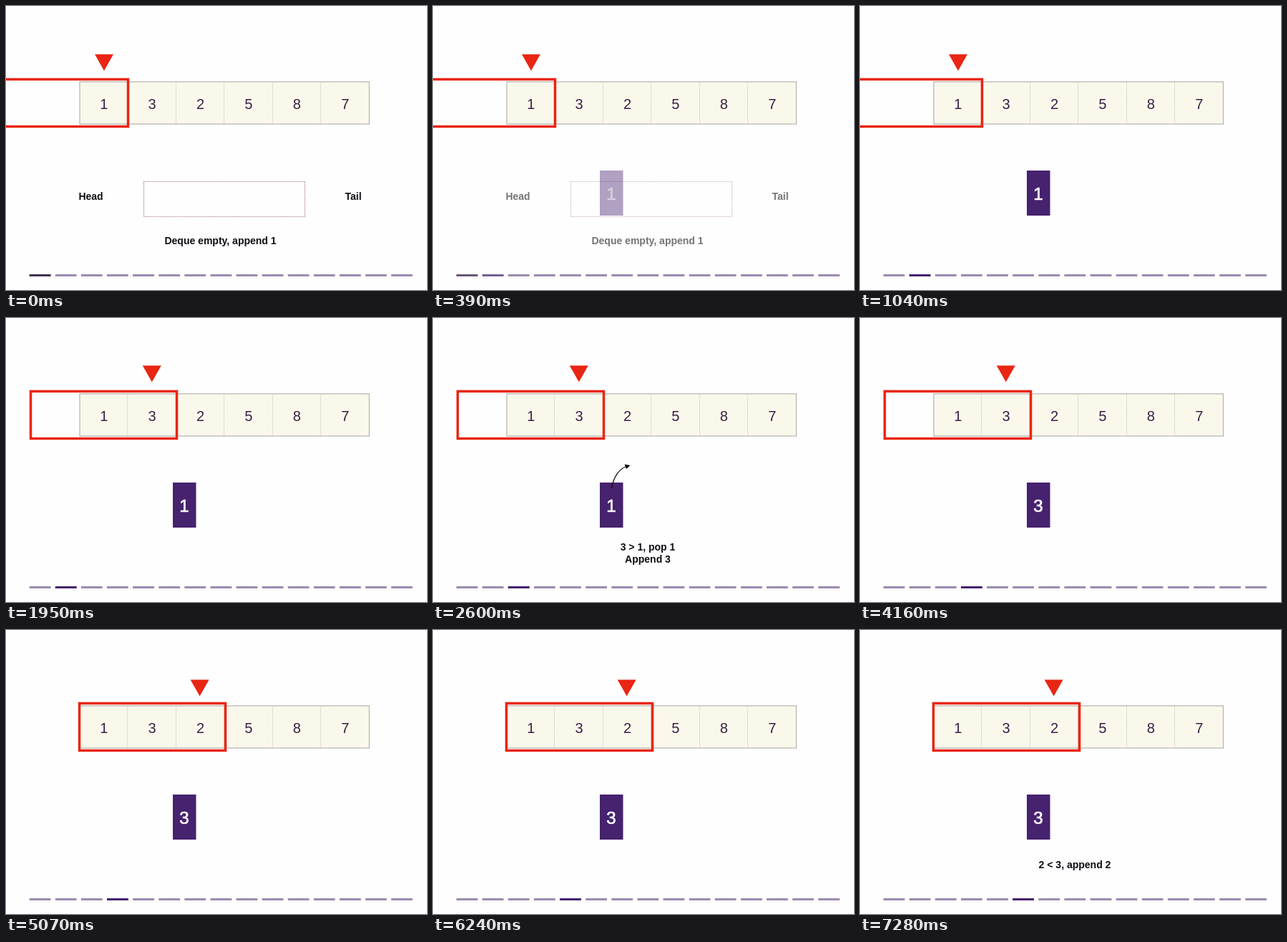
These frames come from a looping animation (588 px wide and 397 px high, 8 s). An HTML page with a canvas:

```html
<!DOCTYPE html>
<html lang="en">
<head>
<meta charset="utf-8">
<title>Sliding window deque</title>
<style>
html, body { margin: 0; width: 100%; height: 100%; overflow: hidden; background: #fefefe; }
canvas { display: block; }
</style>
</head>
<body>
<canvas id="stage" width="588" height="397"></canvas>
<script>
const ctx = document.getElementById('stage').getContext('2d');
const LOOP = 8000, STEP = 130;
const RED = '#e92513', PURPLE = '#46226f', INK = '#100c14';
const SANS = '"Liberation Sans", Arial, sans-serif';
const VALUES = [1, 3, 2, 5, 8, 7];
const CELL = { x: 103, y: 106, w: 67.4, h: 59 };
const MARKER_TOPS = [67.5, 66.5, 69.5];

const progress = (t, from, to) => Math.min(1, Math.max(0, (t - from) / (to - from)));

function withAlpha(alpha, draw) {
  if (alpha <= 0) return;
  ctx.save();
  ctx.globalAlpha = alpha;
  draw();
  ctx.restore();
}

function label(text, x, y, font, color) {
  ctx.font = `${font} ${SANS}`;
  ctx.fillStyle = color;
  ctx.fillText(text, x, y);
}

const caption = (text, x, y) => label(text, x, y, 'bold 14px', INK);

function line(color, width, dash = []) {
  ctx.strokeStyle = color;
  ctx.lineWidth = width;
  ctx.setLineDash(dash);
}

function polygon(color, ...points) {
  ctx.fillStyle = color;
  ctx.beginPath();
  points.forEach(([x, y]) => ctx.lineTo(x, y));
  ctx.fill();
}

function drawArray() {
  const { x, y, w, h } = CELL;
  ctx.fillStyle = '#faf8eb';
  ctx.fillRect(x, y, w * 6, h);
  VALUES.forEach((value, i) => {
    const left = x + i * w;
    if (i) {
      line('#c5c1ba', 1, [1, 1]);
      ctx.beginPath();
      ctx.moveTo(Math.round(left) - 0.5, y);
      ctx.lineTo(Math.round(left) - 0.5, y + h);
      ctx.stroke();
    }
    label(value, left + w / 2, 143.5, '20px', '#3b2046');
  });
  line('#bbb9b6', 1.3);
  ctx.strokeRect(x, y, w * 6, h);
}

function drawWindow(index) {
  const middle = 137 + index * 66.8, top = MARKER_TOPS[index];
  line(RED, 3.5);
  ctx.strokeRect(-33.5 + index * 68, 102.5, 204, 66);
  polygon(RED, [middle - 13, top], [middle + 13, top], [middle, top + 23]);
}

function drawEmptyDeque() {
  line('#a3708c', 1.2, [1.2, 1.2]);
  ctx.strokeRect(192.5, 245.5, 225, 49);
  caption('Head', 118.5, 271);
  caption('Tail', 485, 271);
  caption('Deque empty, append 1', 299.5, 333);
}

function drawBlock() {
  ctx.fillStyle = PURPLE;
  ctx.fillRect(233, 230, 32.5, 63);
}

function blockDigit(value) {
  label(value, 249, 270.5, '24px', '#fff');
  line('#fff', 0.7);
  ctx.strokeText(value, 249, 270.5);
}

function drawPop() {
  line(INK, 1.3);
  ctx.beginPath();
  ctx.moveTo(249.5, 238);
  ctx.bezierCurveTo(252, 222, 260, 211, 270, 207.5);
  ctx.stroke();
  polygon(INK, [275.5, 206], [267.5, 204.5], [270, 211]);
  caption('3 > 1, pop 1', 300, 325);
  caption('Append 3', 300, 342);
}

function drawPager(weights) {
  for (let i = 0; i < 15; i++) {
    const x = 32.7 + i * 36.1;
    ctx.fillStyle = '#9c8aaf';
    ctx.fillRect(x, 375, 29.8, 3);
    withAlpha(weights[i] || 0, () => {
      ctx.fillStyle = i ? PURPLE : '#43304f';
      ctx.fillRect(x, 375, 29.8, 3);
    });
  }
}

function render(t) {
  const filled = progress(t, 0, 910);
  const popping = progress(t, 1950, 2600);
  const replaced = progress(t, 3380, 4160);
  const moved = progress(t, 5070, 5720);
  const compared = progress(t, 6500, 7280);

  ctx.fillStyle = '#fefefe';
  ctx.fillRect(0, 0, 588, 397);
  ctx.textAlign = 'center';
  drawArray();
  drawWindow(t < 1950 ? 0 : t < 5070 ? 1 : 2);
  withAlpha(1 - filled, drawEmptyDeque);
  withAlpha(filled, drawBlock);
  withAlpha(filled - replaced, () => blockDigit(1));
  withAlpha(replaced, () => blockDigit(3));
  withAlpha(popping - replaced, drawPop);
  withAlpha(compared, () => caption('2 < 3, append 2', 300, 333));
  drawPager([1 - filled, filled - popping, popping - replaced,
    replaced - moved, moved - compared, compared]);
}

function tick() {
  const t = performance.now() % LOOP;
  render(Math.floor(t / STEP) * STEP);
  requestAnimationFrame(tick);
}
tick();
</script>
</body>
</html>
```
